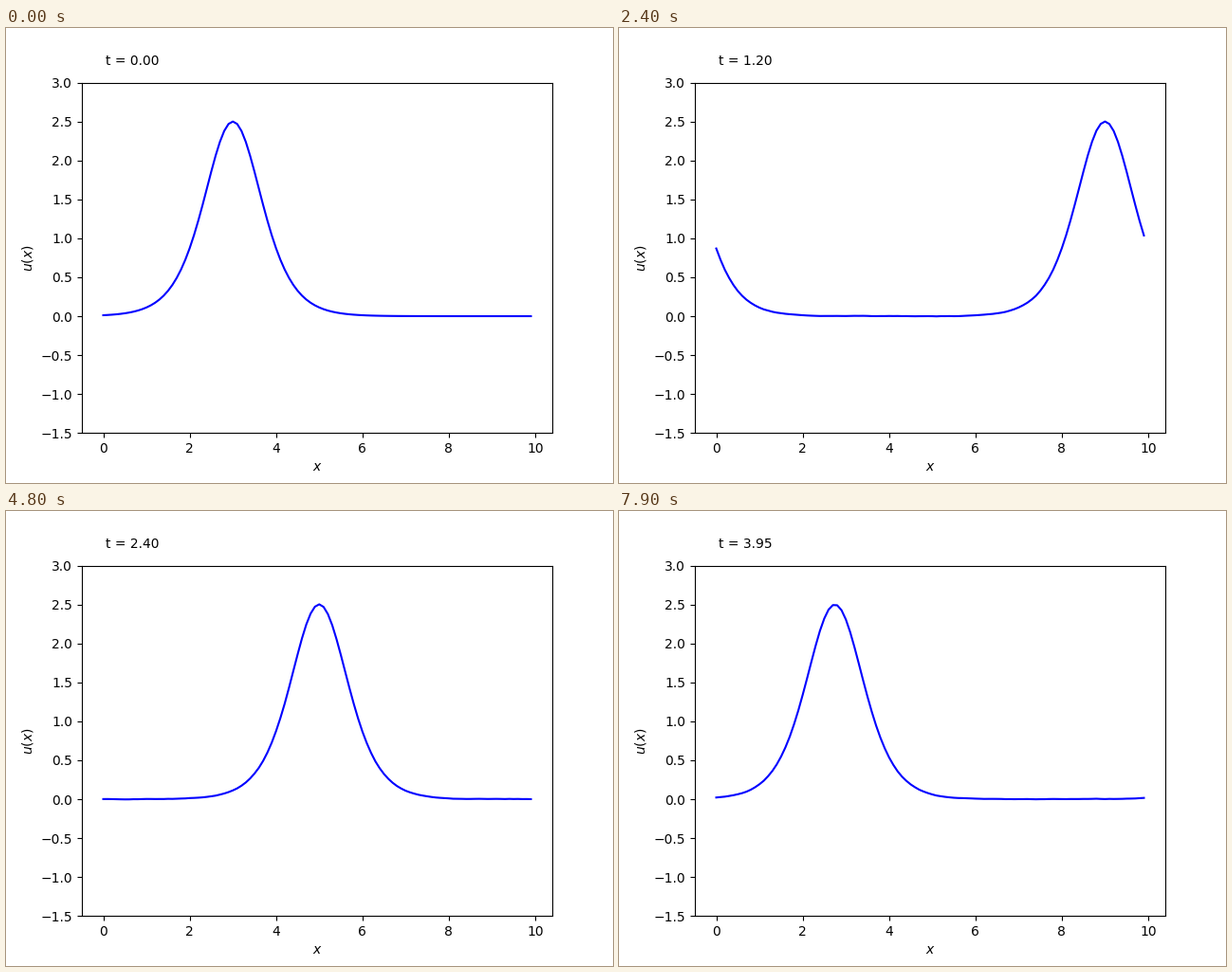
A matplotlib script that plays this animation: 640 by 480 pixels, repeating every 8000 ms.

```python
import numpy as np
import matplotlib.pyplot as plt
from matplotlib.animation import FuncAnimation

# Korteweg-de Vries soliton on a periodic domain, u_t + 6 u u_x + u_xxx = 0
LENGTH, N = 10, 100
SPEED, START = 5.0, 3.0
FRAMES, DT, SUBSTEPS = 80, 0.05, 100

x = np.arange(N) * LENGTH / N
k = 2 * np.pi * np.fft.rfftfreq(N, LENGTH / N)
k[-1] = 0  # the Nyquist mode has no odd derivative


def soliton(x):
    return SPEED / 2 / np.cosh(np.sqrt(SPEED) / 2 * (x - START)) ** 2


def flux(v):
    return -3j * k * np.fft.rfft(np.fft.irfft(v, N) ** 2)


def solve():
    """Integrating-factor RK4 in Fourier space; one row per frame."""
    h = DT / SUBSTEPS
    half = np.exp(0.5j * h * k**3)
    full = half**2
    v = np.fft.rfft(soliton(x))
    rows = [soliton(x)]
    for _ in range(FRAMES - 1):
        for _ in range(SUBSTEPS):
            a = h * flux(v)
            b = h * flux(half * (v + a / 2))
            c = h * flux(half * v + b / 2)
            d = h * flux(full * v + half * c)
            v = full * v + (full * a + 2 * half * (b + c) + d) / 6
        rows.append(np.fft.irfft(v, N))
    return rows


waves = solve()

fig, ax = plt.subplots(figsize=(6.4, 4.8), dpi=100)
line, = ax.plot(x, waves[0], "b", lw=1.5)
ax.set_ylim(-1.5, 3)
ax.set_xlabel("$x$")
ax.set_ylabel("$u(x)$")
clock = ax.text(0.05, 1.05, "", transform=ax.transAxes)


def update(i):
    line.set_ydata(waves[i])
    clock.set_text(f"t = {i * DT:.2f}")
    return line, clock


anim = FuncAnimation(fig, update, frames=FRAMES, interval=100,
                     repeat=True, repeat_delay=0)
plt.show()
```
